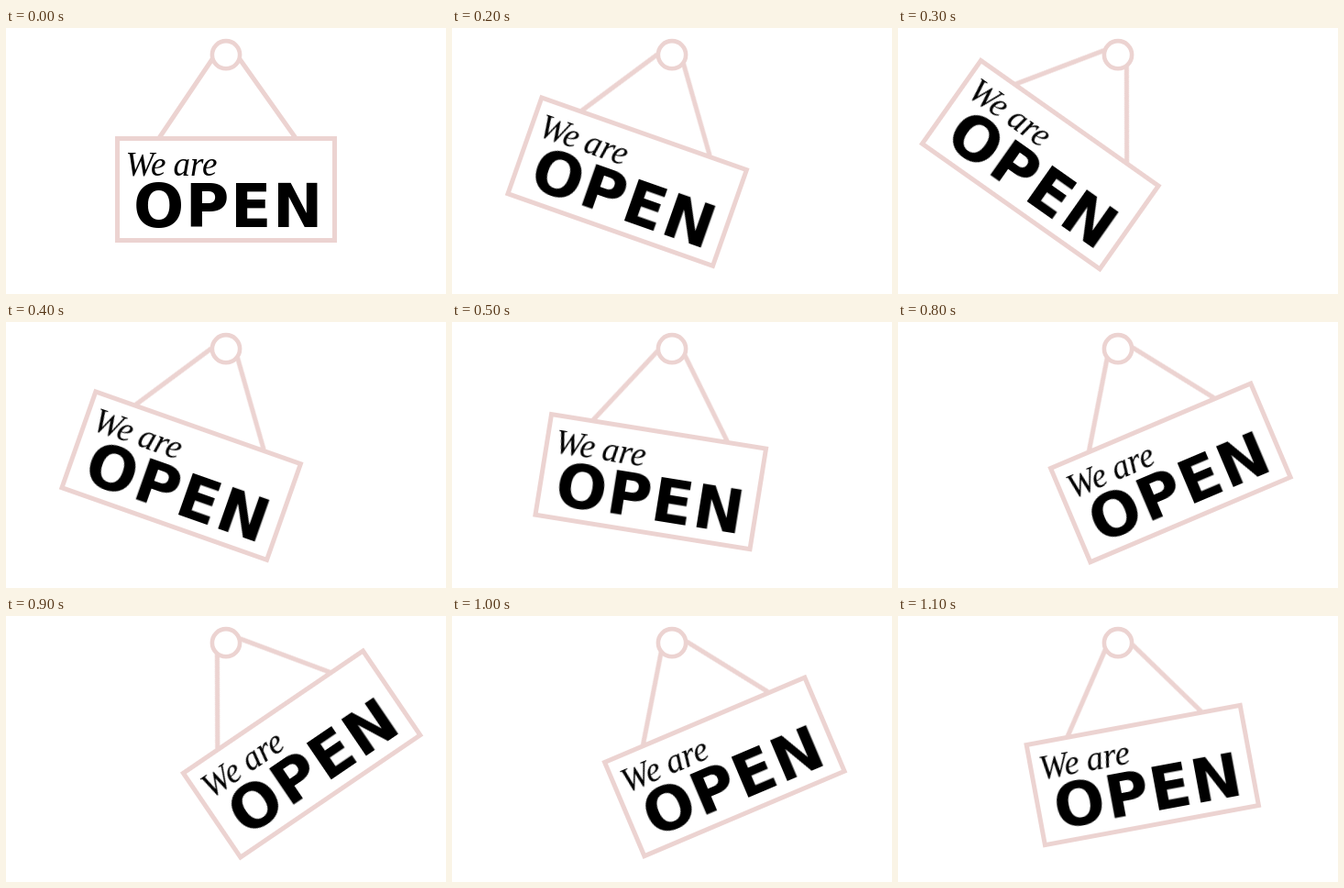
An HTML page for the animation above (1200 ms loop, 480 by 290 pixels).

```html
<!DOCTYPE html>
<html lang="en">
<head>
<meta charset="utf-8">
<title>Swinging open sign</title>
<style>
  html, body { margin: 0; width: 100%; height: 100%; overflow: hidden; background: #fff; }
  svg { display: block; width: 480px; height: 290px; }
  #sign { transform-origin: 240px 29px; }
  .line { fill: none; stroke: #ecd3d1; stroke-width: 5; }
  .ring { fill: #fff; stroke-width: 4.6; }
  .script { font: italic 37px "Liberation Serif", "Times New Roman", serif; word-spacing: -1px; }
  .bold { font: 700 65px "DejaVu Sans", Inter, sans-serif; letter-spacing: 1.6px; }
</style>
</head>
<body>
<svg viewBox="0 0 480 290">
  <g id="sign">
    <path class="line" d="M167 120L225 34M316 120L255 34"/>
    <rect class="line" x="121.5" y="120.5" width="237" height="111"/>
    <text class="script" x="130.5" y="161">We are</text>
    <text class="bold" x="139" y="216.5">OPEN</text>
  </g>
  <circle class="line ring" cx="240" cy="29.2" r="15.1"/>
</svg>
<script>
  // Angle in degrees for each 100 ms step: swing left, then right.
  const left = [0, 9.1, 19.4, 35.2, 19.4, 9.1];
  const right = [0, -10.5, -22.95, -34.2, -22.95, -10.5];
  const angles = [...left, ...right, 0];
  const poses = angles.map(a => ({ transform: `rotate(${a}deg)`, easing: "step-end" }));
  document.getElementById("sign").animate(poses, { duration: 1200, iterations: Infinity });
</script>
</body>
</html>
```
